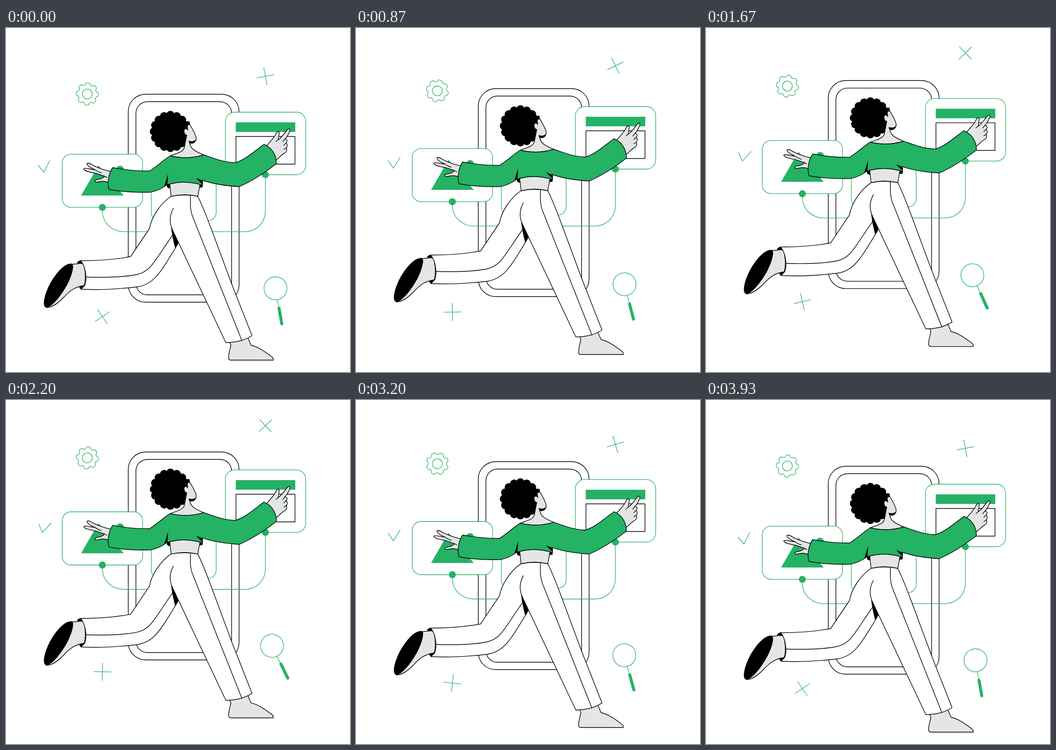
Animation, 748 px wide and 748 px high, one loop 3.99 s. Source, as an HTML page:

```html
<!DOCTYPE html>
<html lang="en">
<head>
<meta charset="utf-8">
<title>Runner with app cards</title>
<style>
html, body { margin: 0; width: 100%; height: 100%; overflow: hidden; background: #fff; }
svg { display: block; width: 100%; height: 100%; }
.ink { stroke: #000; stroke-width: 1.4; stroke-linejoin: round; stroke-linecap: round; fill: none; }
.line { stroke: #24b264; stroke-width: 1.3; fill: none; }
.handle { stroke-width: 6.5; stroke-linecap: round; }
.green { fill: #24b264; }
.skin { fill: #e4e5e7; }
.white { fill: #fff; }
</style>
</head>
<body>
<svg viewBox="0 0 748 748">
  <g id="scene">
    <!-- phone -->
    <rect class="ink white" x="265.8" y="144" width="241" height="452.3" rx="38"/>
    <rect class="ink" x="282.5" y="160.3" width="208" height="420" rx="25"/>

    <!-- cards and connector -->
    <rect class="line" x="316" y="325" width="141" height="94" rx="18"/>
    <path class="line" d="M209.5 390V396C209.5 424 230 442.8 257 442.8H518C545 442.8 564 424 564 397V319"/>
    <rect class="line white" x="122.3" y="274.3" width="174.7" height="115.5" rx="19"/>
    <path class="green" d="M163.3 364.3L201 299L256 364.3Z"/>
    <circle class="green" cx="248" cy="308" r="8.5"/>
    <circle class="green" cx="209.5" cy="390" r="7.6"/>
    <rect class="line white" x="477" y="183" width="174.6" height="136" rx="20"/>
    <rect class="green" x="499.6" y="205.2" width="129.4" height="20.8"/>
    <rect class="ink" x="500" y="235.8" width="128.4" height="60.2"/>
    <circle class="green" cx="564" cy="319" r="7.6"/>

    <!-- back foot -->
    <path class="ink skin" d="M141 514Q155 513 168 511Q176 540 170 560C150 563 140 570 126 585C112 600 98 608 88 608Z"/>
    <path class="ink" style="fill:#000" d="M143 513C148 516 144 535 133 557C120 581 102 603 90 607C80 609 82 592 88 575C98 547 124 511 143 513Z"/>
    <path d="M154 511Q158 504 167 506L171 514ZM159 562Q160 569 168 569L171 559Z"/>

    <!-- front foot -->
    <path class="ink skin" d="M486 682L489 690C487 700 484 707 484 718Q485 722 489 722.3H581Q582 718 578 715C562 703 548 693 533 690L526 674Z"/>

    <!-- trousers -->
    <path class="ink white" d="M359 366C335 382 316 412 312 436L271 497C240 503 200 506 162 506C173 517 177 546 171 560L163 568C200 570 250 567 285 563C322 558 336 531 371 474L400 420L390 366Z"/>
    <path class="ink" d="M174 541.5C220 543 260 541 285 536C316 529 322 507 364 448"/>
    <path d="M359 433C361 450 364 465 368 479L375 465Z"/>
    <path class="white" d="M359 366Q388 360 417 366C430 392 440 420 449 444L492 560L535 669Q512 684 478 684L363 441C355 425 355 408 364 392Z"/>
    <path class="ink" d="M364 392C355 408 355 425 363 441L478 684Q512 684 535 669L492 560L449 444C440 420 430 392 417 366Q388 360 359 366M401 363V387Q402 402 407 413L513 680"/>

    <!-- waist -->
    <path d="M350 338V345Q352 350 359 348L358 336ZM419 337L427.5 341V346Q424 348 419 346Z"/>
    <path class="ink skin" d="M356 339Q388 331 422 339L417 366Q388 359 359 366Z"/>

    <!-- head -->
    <path id="hair"/>
    <path class="ink skin" d="M399 209C404 217 412 231 413.5 239C414 246 410 249 405 248L398 246L400 252C402 262 408 267 430 276Q394 287 357 278C372 272 386 270 388 259L393 233C386 231 385 219 391 219C395 218 396 223 395 222L394 212Z"/>
    <path d="M388 203L399 203L400 210L395 212L395 222L391 219L386 221ZM397 246Q407 248 414 242Q411 254 400 251Z"/>

    <!-- hands -->
    <path class="ink skin" d="M229 312C214 310 201 304 190 299C184 295 179 292 176 295C176 299 184 304 193 308C185 308 173 303 169 306C170 311 180 313 195 316L213 322C214 326 205 329 197 330C191 332 192 336 199 335C207 333 214 332 224 336Z"/>
    <path class="ink" d="M193 308Q200 313 207 315M213 322L219 325"/>
    <path class="ink skin" d="M567 256C575 246 582 240 586 232C588 226 592 223 594 226C595 230 592 238 592 243C600 238 606 228 611 222C615 217 618 219 617 224C614 232 610 238 607 241C611 242 613 246 609 250C613 253 612 258 609 261C612 264 610 270 606 272C600 274 594 283 586 288Z"/>
    <path class="ink" d="M607 241L602 247M609 250L604 255M609 261L604 264M592 243L587 247"/>

    <!-- sweater -->
    <path class="ink green" d="M357 278Q394 287 430 276C446 281 470 292 498 293C520 287 540 268 561 253C580 261 588 278 588 295C565 313 535 333 507 345C475 343 447 338 427 331L427.5 342Q388 329 350 341Q332 354 314 357C285 358 250 356 224 351C219 335 224 315 232 303.5C255 308 285 311 312 311C330 300 342 287 357 278Z"/>
    <path d="M352.5 317L344 345L351 341ZM413 326L428 332V341L423 336Z"/>
  </g>

  <g id="cross" class="line"><path d="M0-19.3V19.3M-19.3 0H19.3"/></g>
  <g id="plus" class="line"><path d="M0-19.3V19.3M-19.3 0H19.3"/></g>
  <g id="check" class="line"><path d="M-13.5-3.5L-.5 12L12-13.5"/></g>
  <g id="gear" class="line"><path id="teeth"/><circle r="10.8"/></g>
  <g id="lens" class="line">
    <circle cy="-27.5" r="25"/>
    <path d="M4-3L7.5 16"/>
    <path class="handle" d="M7.7 16L13.6 49.5"/>
  </g>
</svg>
<script>
const $ = id => document.getElementById(id);
const STEP = 1000 / 15, LAST = 59, LOOP = 3990;

// Floating parts: rest position, rest angle, rise, turn, and start / peak / end of the swing in steps
const parts = [
  { id: 'scene', x: 0, y: 0, angle: 0, rise: 31.9, turn: 0, swing: [0.4, 30, 59] },
  { id: 'cross', x: 564, y: 105, angle: -10.5, rise: 52.7, turn: -35, swing: [0, 28.5, 55] },
  { id: 'plus', x: 209.6, y: 627.5, angle: -34, rise: 37, turn: 126, swing: [3.5, 31.3, 58.4] },
  { id: 'check', x: 83, y: 301.5, angle: 0, rise: 25.5, turn: 17.5, swing: [2, 30, 58] },
  { id: 'gear', x: 176.9, y: 143.5, angle: 3, rise: 18.3, turn: -90, swing: [1, 29.5, 58] },
  { id: 'lens', x: 586, y: 593.5, angle: 0, rise: 33, turn: -16.2, swing: [3.5, 31, 59] }
];

// Closed path through points at polar radius(angle)
function ring(radius, count) {
  let d = '';
  for (let i = 0; i < count; i++) {
    const a = i / count * 2 * Math.PI, r = radius(a);
    d += (i ? 'L' : 'M') + (r * Math.sin(a)).toFixed(2) + ' ' + (-r * Math.cos(a)).toFixed(2);
  }
  return d + 'Z';
}

// Scalloped edge: arcs between points on a circle
function scallops(cx, cy, r, count, bump) {
  let d = '';
  for (let i = 0; i <= count; i++) {
    const a = (i + 0.5) / count * 2 * Math.PI;
    const point = `${cx + r * Math.sin(a)} ${cy - r * Math.cos(a)}`;
    d += i ? `A${bump} ${bump} 0 0 1 ${point}` : `M${point}`;
  }
  return d + 'Z';
}

$('teeth').setAttribute('d', ring(a => 21.9 + 2.3 * Math.tanh(1.8 * Math.cos(8 * a) + 0.4), 160));
$('hair').setAttribute('d', scallops(357.5, 225, 40.5, 16, 8.8));

function ease([start, peak, end], step) {
  const p = step < peak ? (step - start) / (peak - start) : (end - step) / (end - peak);
  return (1 - Math.cos(Math.PI * Math.max(0, p))) / 2;
}

function draw(now) {
  const step = Math.min(LAST, Math.floor((now % LOOP + 3.4) / STEP));
  for (const { id, x, y, angle, rise, turn, swing } of parts) {
    const p = ease(swing, step);
    $(id).setAttribute('transform', `translate(${x} ${y - rise * p}) rotate(${angle + turn * p})`);
  }
}

const begin = performance.now();
function tick() {
  draw(performance.now() - begin);
  requestAnimationFrame(tick);
}
tick();
</script>
</body>
</html>
```
